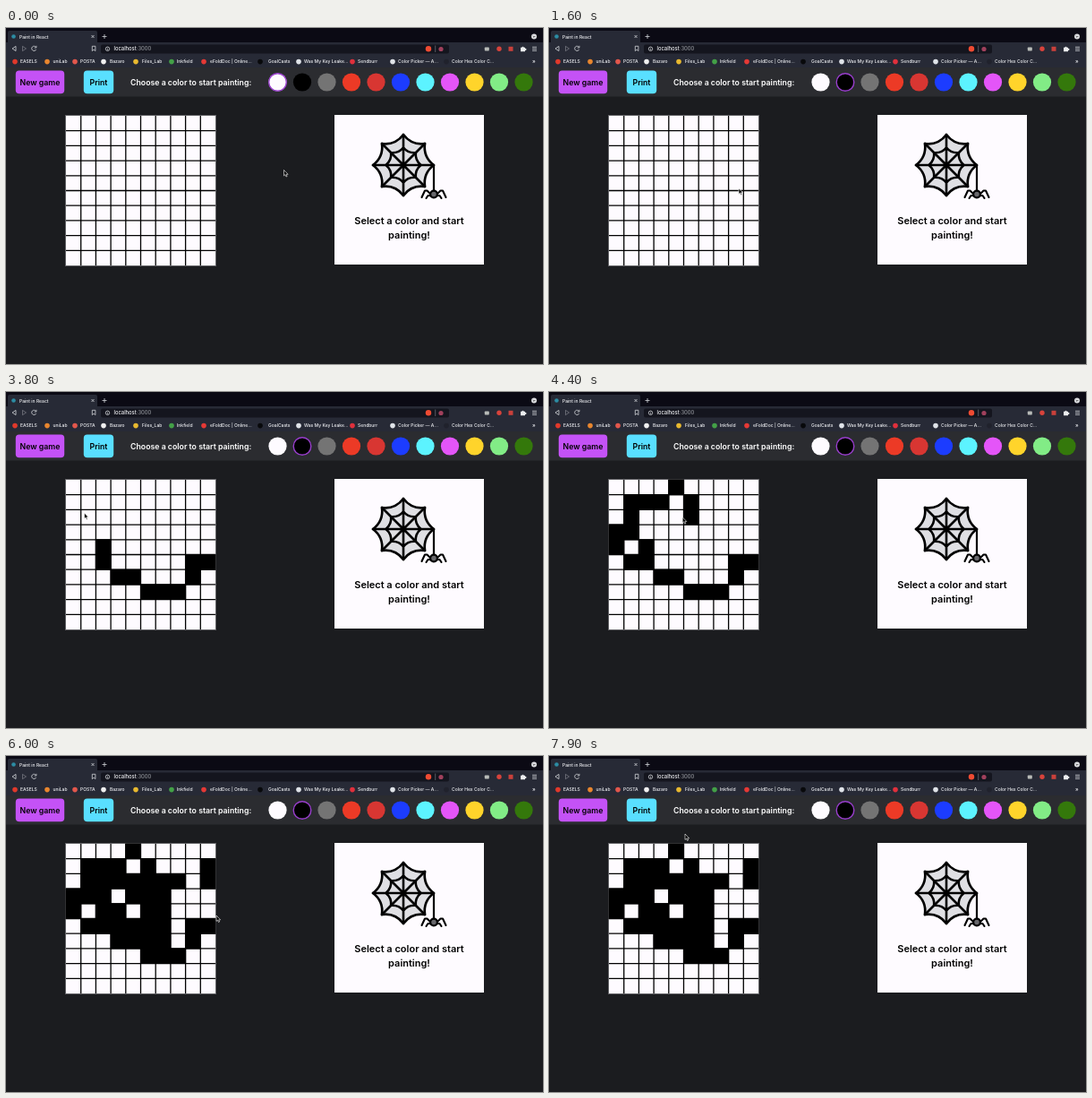
An HTML page for the animation above (8000 ms loop, 600 by 375 pixels).

```html
<!DOCTYPE html>
<html lang="en">
<head>
<meta charset="utf-8">
<title>Paint in React</title>
<style>
  html, body { margin: 0; width: 100%; height: 100%; overflow: hidden; background: #1b1c1f; }
  svg { display: block; width: 100vw; height: 100vh; font-family: Inter, Roboto, sans-serif; }
  .ui { font-size: 5px; font-weight: 500; fill: #f0f1f4; }
  .bold { font-weight: 600; font-size: 8.75px; }
  .line { fill: none; stroke: #d4d6da; stroke-width: .8; }
  .ink { fill: none; stroke: #000; stroke-linecap: round; stroke-linejoin: round; }
</style>
</head>
<body>
<svg id="stage" viewBox="0 0 600 375"></svg>
<script>
const stage = document.getElementById('stage');
const LOOP = 8000, STEP = 100, CELL = 16.7, LEFT = 67, TOP = 98;
const PAPER = '#fefbff';

const rect = (x, y, w, h, fill, rx = 0) =>
  `<rect x="${x}" y="${y}" width="${w}" height="${h}" rx="${rx}" fill="${fill}"/>`;
const dot = (x, y, r, fill, more = '') =>
  `<circle cx="${x}" cy="${y}" r="${r}" fill="${fill}" ${more}/>`;
const text = (x, y, label, more = 'class="ui"') => `<text x="${x}" y="${y}" ${more}>${label}</text>`;
const path = (d, more) => `<path d="${d}" ${more}/>`;

// Browser window: [icon x, text x, label, icon colour]
const bookmarks = [
  [10, 16, 'EASELS', '#e0392b'], [46, 52.5, 'uniLab', '#e8862e'], [77, 83, 'POSTA', '#e2574c'],
  [109, 116, 'Bazaro', '#f0f0f0'], [145, 152, 'Files_Lab', '#e8b92f'], [185, 191, 'Inkfield', '#43a047'],
  [221, 228, 'eFoldDoc | Online...', '#e53935'], [284, 293, 'GoalCasts', '#08090b'],
  [327, 333, 'Was My Key Leake...', '#dfe3e8'], [387, 393, 'Sendburr', '#e0303c'],
  [432, 438, 'Color Picker — A...', '#dfe3e8'], [492, 498, 'Color Hex Color C...', '#20222c'],
];

function browser() {
  const bar = '#272a36';
  return rect(0, 0, 600, 16, '#0b0a14') + rect(2, 3, 100, 15, bar, 2) + rect(0, 16, 600, 28, bar) +
    dot(8.5, 9.5, 2.3, '#2c8ca3') + text(15, 11.5, 'Paint in React', 'class="ui"') +
    path('M95.5 8l3 3m0-3l-3 3M110 7v5m-2.5-2.5h5', 'class="line"') +
    dot(590, 9.5, 3, '#dcdde0') + path('M588.7 9l1.3 1.3 1.3-1.3', 'fill="none" stroke="#111" stroke-width=".7"') +
    path('M11 20.4v5.2l-4-2.6z', 'class="line"') +
    path('M18.5 20.4v5.2l4-2.6z', 'class="line" opacity=".45"') +
    path('M33.4 21.3a2.6 2.6 0 1 0 .3 2.6M33.9 19.8v2.2h-2.2', 'class="line"') +
    path('M96.3 20.3h3.6v5.3l-1.8-1.5-1.8 1.5z', 'class="line"') +
    rect(106, 18.5, 389, 10, '#14151e', 2) + dot(113.5, 23.3, 2.2, 'none', 'class="line"') +
    path('M113.5 23v1.5m0-2.7v.4', 'class="line"') +
    text(120.5, 25.3, 'localhost<tspan fill="#8d9096">:3000</tspan>', 'class="ui" style="font-size:5.8px"') +
    dot(472, 23.3, 3.2, '#ef4b32') + path('M479.7 19.5v7.5', 'stroke="#85878e" stroke-width=".6"') +
    dot(486, 23.5, 2.6, '#a0405c') +
    rect(534.8, 21.5, 5, 4, '#b8bbb8', .8) + dot(551, 23.3, 2.7, '#d8433b') + rect(561.5, 20.8, 5, 5, '#c9403b') +
    path('M575 21.7h1.5a1 1 0 1 1 2 0h1.5v1.3a1 1 0 1 1 0 1.8v1.4h-5z', 'fill="#eceef0"') +
    path('M588 21.3h5m-5 2h5m-5 2h5', 'class="line"') +
    bookmarks.map(([ix, tx, label, fill]) => dot(ix, 37.6, 2.8, fill) + text(tx, 39.4, label)).join('') +
    text(588, 39.3, '»', 'class="ui" style="font-size:6px"');
}

// Page
const colors = [PAPER, '#000', '#747474', '#ec3a26', '#d83632', '#1c3cff',
                '#5cf3ff', '#e455f8', '#ffd42b', '#82ec86', '#34780b'];
const swatchX = i => 303.5 + 27.5 * i, SWATCH_Y = 60.5;

function header() {
  return rect(0, 44, 600, 32.5, '#2b2c30') +
    rect(10.8, 47.6, 54.4, 25.6, '#c452f6', 4) + rect(86.8, 47.6, 33.4, 25.6, '#59dfff', 4) +
    text(38, 63.9, 'New game', 'class="bold" text-anchor="middle"') +
    text(103.5, 63.9, 'Print', 'class="bold" text-anchor="middle"') +
    text(139, 63.6, 'Choose a color to start painting:', 'class="bold" fill="#fff"') +
    colors.map((fill, i) => dot(swatchX(i), SWATCH_Y, 10.1, fill)).join('') +
    dot(0, SWATCH_Y, 9.8, 'none', 'id="ring" stroke="#9a3fce" stroke-width="1.4"');
}

function board() {
  let lines = '';
  for (let i = 1; i < 10; i++)
    lines += `M${LEFT + i * CELL} ${TOP}v167M${LEFT} ${TOP + i * CELL}h167`;
  return rect(66, 97, 169, 169, '#626266') + rect(LEFT, TOP, 167, 167, PAPER) +
    path(lines, 'stroke="#000" stroke-width="1.3"') + path('', 'id="paint"');
}

function web() {
  const point = (r, k) => {
    const a = k * Math.PI / 4;
    return `${(444 + r * Math.cos(a)).toFixed(1)} ${(153 + r * Math.sin(a)).toFixed(1)}`;
  };
  const ring = (r, sag) => {
    let d = 'M' + point(r, 0);
    for (let k = 0; k < 8; k++) d += `Q${point(r * sag, k + .5)} ${point(r, k + 1)}`;
    return d + 'z';
  };
  let spokes = '';
  for (let k = 0; k < 8; k++) spokes += `M444 153L${point(34, k)}`;
  return path(ring(34, .7), 'class="ink" stroke-width="2.7" style="fill:#dfdfe3"') +
    path(ring(19.5, .72), 'class="ink" stroke-width="2.6"') +
    path(spokes, 'class="ink" stroke-width="2.6"') +
    path('M478 153v28', 'class="ink" stroke-width="2.2"') +
    path('M474 185l-3.5-3.5h-2.5l-3.5 7.5M474 187l-2.5 0-2 3M482 185l3.5-3.5h2.5l3.5 7.5M482 187l2.5 0 2 3',
      'class="ink" stroke-width="2.1"') +
    dot(478, 185.5, 3.9, '#68686c', 'stroke="#000" stroke-width="2.3"');
}

function panel() {
  const caption = 'class="bold" text-anchor="middle" style="font-size:11px"';
  return rect(367, 97, 167, 167, PAPER) + web() +
    text(450.5, 219.2, 'Select a color and start', caption) + text(450.5, 235, 'painting!', caption);
}

stage.innerHTML = rect(0, 0, 600, 375, '#1b1c1f') + browser() + header() + board() + panel() +
  `<g id="pointer">
    <path id="arrow" d="M0 0V6.4L1.5 5.1 2.5 7.5 3.6 7 2.6 4.8H4.6Z" fill="#000" stroke="#fff" stroke-width=".6"/>
    <path id="hand" d="M-.6-.8Q0-1.5.6-.8V1.3L3.3 1.9 3.6 3.6 2.6 6H-.6L-2.6 2.9-1.9 2.3-.6 3.4Z"
      fill="#fff" stroke="#111" stroke-width=".5"/>
  </g>`;

const [ring, paint, pointer, arrow, hand] =
  ['ring', 'paint', 'pointer', 'arrow', 'hand'].map(id => document.getElementById(id));

// Strokes: [start, ms per cell, cells as row and column digits]
const strokes = [
  [2000, 0, '59'],
  [2650, 100, '58 68 77 76 75 64 63 52 42'],
  [3850, 52, '30 40 51 31 21 11 12 13 04 15 25 24 23 22 32 43 53 54 34 35 45 55 65 66 56 46 36 26'],
  [5400, 150, '27 29 19'],
];
const painted = strokes.flatMap(([start, gap, cells]) => cells.split(' ').map((cell, i) => ({
  time: start + i * gap,
  x: LEFT + cell[1] * CELL,
  y: TOP + cell[0] * CELL,
})));

// The pointer visits every painted cell and a few stops between strokes.
const stops = [
  [0, 310.5, 158.5], [200, 310.5, 158.5], [700, 331, 60], [1000, 331, 60], [1600, 212, 179],
  [2600, 211.5, 196], [3800, 87.5, 135], [5300, 195.7, 138], [6000, 235, 178], [6400, 252, 136],
  [6700, 341, 58.7], [7000, 341, 58.7], [7400, 262, 63], [7900, 152, 87], [LOOP, 152, 87],
  ...painted.map(c => [c.time, c.x + CELL / 2, c.y + CELL / 2]),
].sort((a, b) => a[0] - b[0]);

function pointerAt(t) {
  const next = stops.findIndex(s => s[0] > t);
  const [t0, x0, y0] = stops[next - 1], [t1, x1, y1] = stops[next];
  const k = (t - t0) / (t1 - t0);
  return [x0 + (x1 - x0) * k, y0 + (y1 - y0) * k];
}

function draw(now) {
  const t = Math.floor(now % LOOP / STEP) * STEP;
  const [x, y] = pointerAt(t);
  const onSwatch = colors.some((_, i) => Math.hypot(x - swatchX(i), y - SWATCH_Y) < 11);
  pointer.setAttribute('transform', `translate(${x} ${y})`);
  arrow.style.display = onSwatch ? 'none' : '';
  hand.style.display = onSwatch ? '' : 'none';
  ring.setAttribute('cx', swatchX(t < 900 ? 0 : 1));
  paint.setAttribute('d', painted.filter(c => c.time <= t)
    .map(c => `M${c.x - .5} ${c.y - .5}h17.7v17.7h-17.7z`).join(''));
}

const begin = performance.now();
function frame() {
  draw(performance.now() - begin);
  requestAnimationFrame(frame);
}
frame();
</script>
</body>
</html>
```
